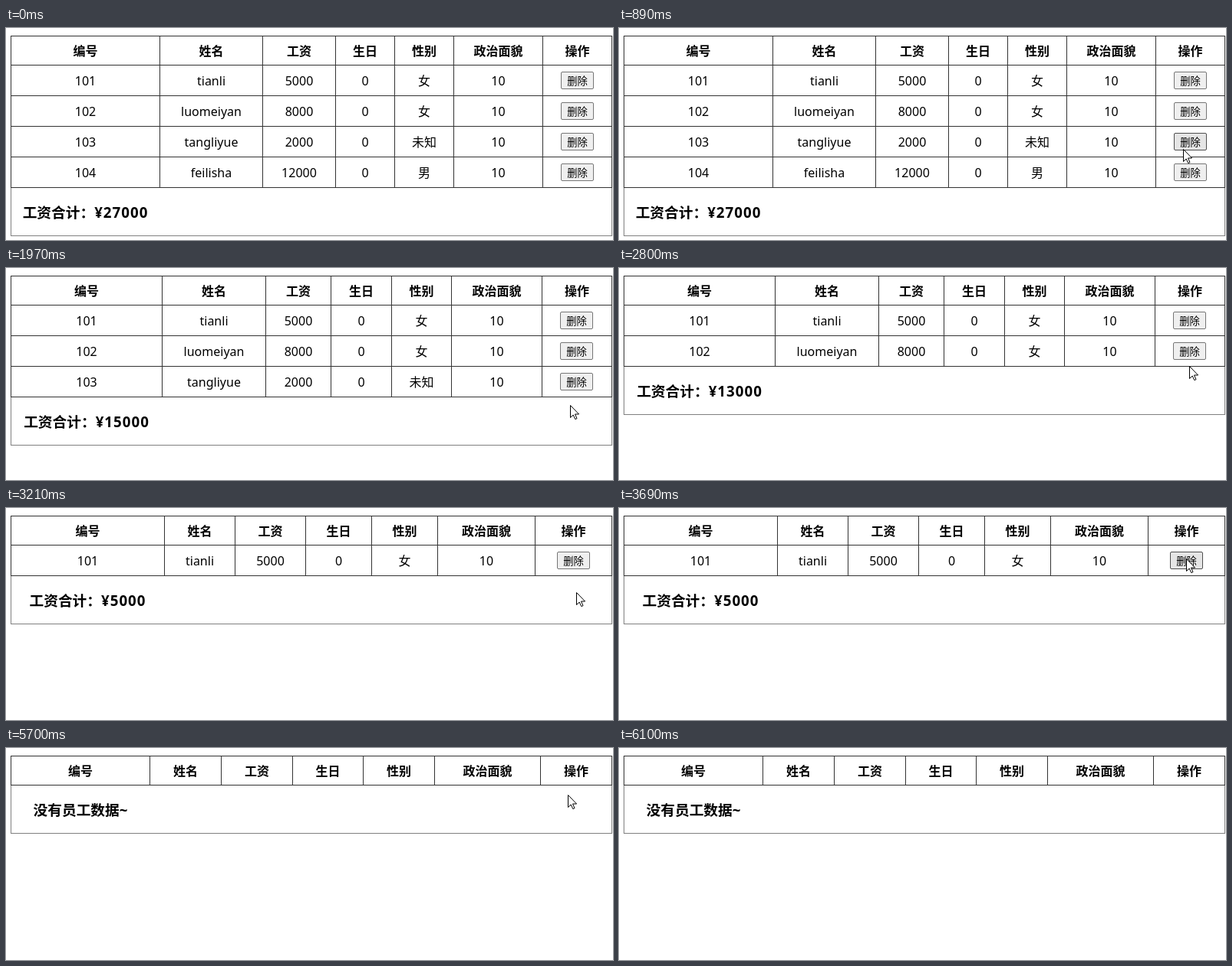
Write an HTML page with a canvas that moves like this. It is 791 px wide and 277 px high and loops after 6.5 s.

```html
<!DOCTYPE html>
<html lang="zh-CN">
<head>
<meta charset="utf-8">
<title>员工表</title>
<style>
  html, body { margin: 0; width: 100%; height: 100%; overflow: hidden; background: #fff; }
  #stage { position: relative; width: 791px; height: 277px; overflow: hidden;
    font: 16px 'Noto Sans', 'Noto Sans CJK SC', 'Noto Sans CJK', sans-serif; color: #000; }
  #stage div, #stage canvas { position: absolute; box-sizing: border-box; white-space: nowrap; }
  #stage canvas { left: 0; top: 0; }
  .cell { border: 1px solid #333; text-align: center; }
  .head { font-weight: bold; }
  .foot { border: 1px solid #808080; }
  .note { font-size: 18.72px; font-weight: bold; text-align: center; }
  .note span { letter-spacing: 1px; }
  #stage .btn { width: 43px; height: 23px; line-height: 22px; border: 1px solid #767676;
    border-radius: 2px; background: #efefef; font-size: 13.333px; text-align: center; }
  #stage .hover { background: #e5e5e5; border-color: #4f4f4f; }
  #stage .active { background: #f5f5f5; border-color: #8d8d8d; }
</style>
</head>
<body>
<div id="stage">
  <div id="table"></div>
  <canvas id="top" width="791" height="277"></canvas>
</div>
<script>
const LOOP = 6500, STEP = 68, PRESS = 70;
const LEFT = 6, WIDTH = 783, TOP = 10, HEAD_H = 38, ROW_H = 40, FOOT_H = 63;
const PAD = 33.4, BTN_W = 43, BTN_H = 23;

const heads = ['编号', '姓名', '工资', '生日', '性别', '政治面貌', '操作'];
const staff = [
  [101, 'tianli', 5000, 0, '女', 10],
  [102, 'luomeiyan', 8000, 0, '女', 10],
  [103, 'tangliyue', 2000, 0, '未知', 10],
  [104, 'feilisha', 12000, 0, '男', 10]
];

// Each press removes the last row
const presses = [1440, 2460, 3140, 4830];

// Cursor moves: start, end, x, y; it rests in between
const moves = [
  [550, 550, 518, 5],
  [550, 890, 735, 158],
  [890, 1030, 735, 197],
  [1030, 1240, 735, 185],
  [1900, 1970, 735, 179],
  [1970, 2390, 737, 151],
  [2660, 2800, 743, 128],
  [2800, 2930, 743, 110],
  [3410, 3690, 739, 66],
  [5630, 6100, 600, -40]
];

const table = document.getElementById('table');
const ctx = document.getElementById('top').getContext('2d');
const arrow = new Path2D('M.5 .5V16.5L4.2 13L6.8 18.6L9 17.6L6.5 12H11.6Z');
let buttons = [], shown = -1;

function charWidth(c) {
  if (c > '\u2fff') return 16.3;
  if (/\d/.test(c)) return 9.52;
  return /[ijlt]/.test(c) ? 4.12 : 10.37;
}

const textWidth = s => [...String(s)].reduce((sum, c) => sum + charWidth(c), 0);

// Shares the table width by the widest content of each column
function columnLines(rows, footWidth) {
  const widths = heads.map((head, i) => {
    if (i === 0) return footWidth;
    const button = i === 6 && rows.length ? BTN_W + .5 : 0;
    return PAD + Math.max(button, textWidth(head), ...rows.map(r => textWidth(r[i] ?? '')));
  });
  const scale = WIDTH / widths.reduce((a, b) => a + b);
  let x = LEFT;
  return [LEFT, ...widths.map(w => Math.round(x += w * scale))];
}

function box(cls, x, y, w, h, html = '') {
  const el = document.createElement('div');
  el.className = cls;
  el.style.cssText = `left:${x}px;top:${y}px;width:${w}px;height:${h}px`;
  el.innerHTML = html;
  table.append(el);
  return el;
}

function drawRow(cls, cols, y, h, values) {
  heads.forEach((_, i) => {
    const cell = box('cell ' + cls, cols[i], y, cols[i + 1] - cols[i] + 1, h + 1, values[i]);
    cell.style.lineHeight = h + 'px';
  });
}

function drawTable(count) {
  const rows = staff.slice(0, count);
  const total = '¥' + rows.reduce((sum, r) => sum + r[2], 0);
  const cols = columnLines(rows, count ? 100 + 10.9 * total.length : 129.3);
  const bodyY = TOP + HEAD_H, footY = bodyY + count * ROW_H;
  table.textContent = '';

  box('foot', LEFT, footY, WIDTH + 1, FOOT_H + 1);
  const note = count ? `工资合计：<span>${total}</span>` : '没有员工数据~';
  box('note', LEFT, footY + 1, cols[1] - LEFT + 1, FOOT_H, note).style.lineHeight = FOOT_H + 'px';

  drawRow('head', cols, TOP, HEAD_H, heads);
  buttons = rows.map((r, i) => {
    const rowY = bodyY + i * ROW_H, y = rowY + 9;
    const x = Math.floor((cols[6] + cols[7] + 1 - BTN_W) / 2);
    drawRow('', cols, rowY, ROW_H, r);
    return { x, y, el: box('btn', x, y, BTN_W, BTN_H, '删除') };
  });
}

function cursorAt(t) {
  let pos = [-50, -50];
  for (const [start, end, x, y] of moves) {
    if (t < start) break;
    const elapsed = Math.floor((t - start + 6) / STEP) * STEP;
    const p = t >= end ? 1 : Math.min(1, elapsed / (end - start));
    const ease = (1 - Math.cos(Math.PI * p)) / 2;
    pos = [x, y].map((to, i) => Math.round(pos[i] + (to - pos[i]) * ease));
  }
  return pos;
}

function draw(t) {
  const count = staff.length - presses.filter(p => t >= p + PRESS).length;
  if (count !== shown) drawTable(shown = count);

  const [x, y] = cursorAt(t);
  const pressed = presses.some(p => t >= p && t < p + PRESS);
  for (const b of buttons) {
    const over = x >= b.x && x < b.x + BTN_W && y >= b.y && y < b.y + BTN_H;
    b.el.className = 'btn' + (over ? (pressed ? ' active' : ' hover') : '');
  }

  ctx.clearRect(0, 0, 791, 277);
  if (pressed) {
    ctx.fillStyle = 'rgba(250, 235, 0, .6)';
    ctx.beginPath();
    ctx.arc(x + 1, y + 3, 12.5, 0, Math.PI * 2);
    ctx.fill();
  }
  ctx.save();
  ctx.translate(x, y);
  ctx.fillStyle = '#fff';
  ctx.strokeStyle = '#000';
  ctx.fill(arrow);
  ctx.stroke(arrow);
  ctx.restore();
}

function tick() {
  draw(performance.now() % LOOP);
  requestAnimationFrame(tick);
}
tick();
</script>
</body>
</html>
```
